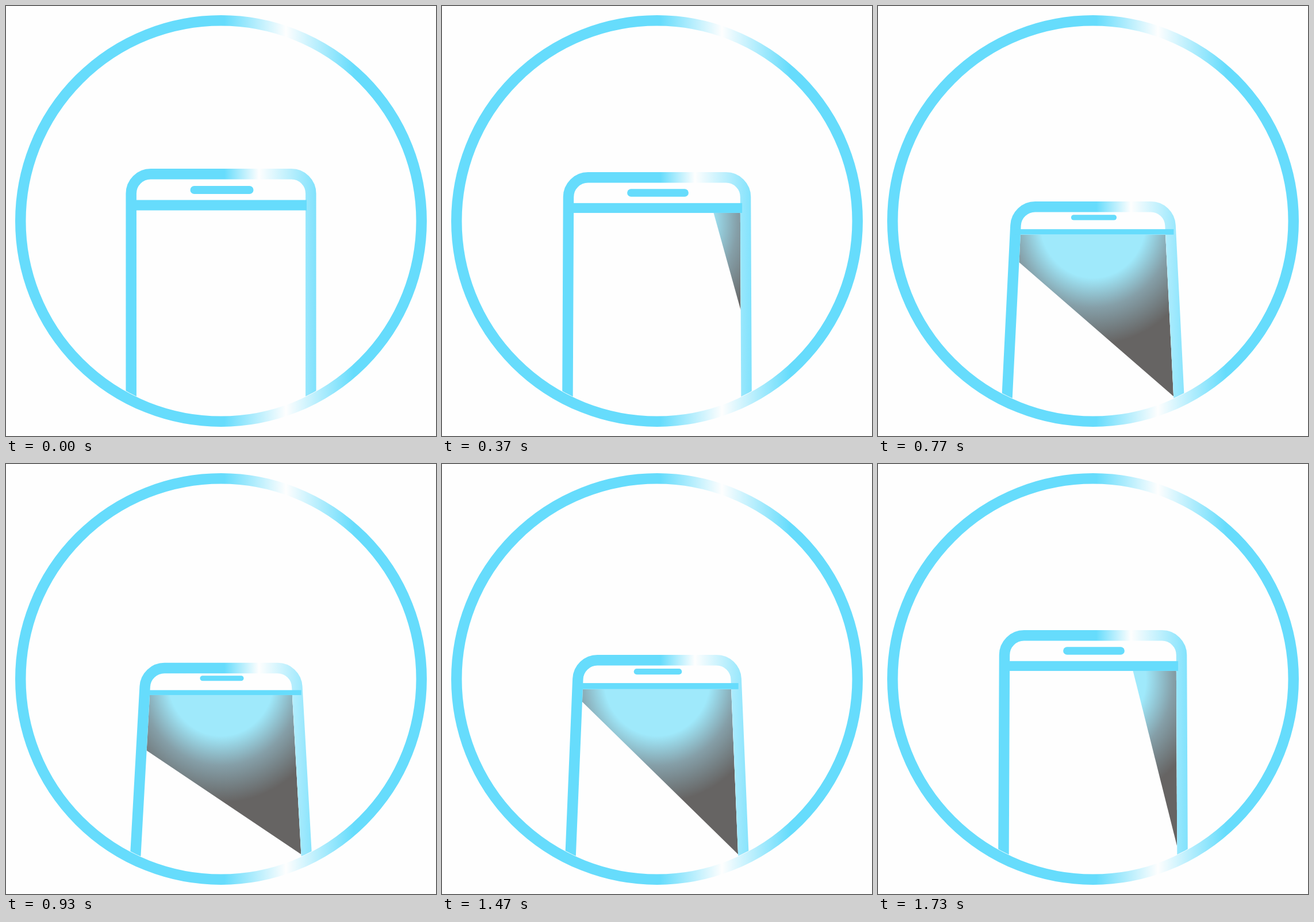
These frames come from a looping animation (748 by 748 pixels, 1770 ms). An HTML page with a canvas:

```html
<!DOCTYPE html>
<html>
<head>
<meta charset="utf-8">
<style>
html, body { margin: 0; width: 100%; height: 100%; overflow: hidden; background: #fefefe; }
canvas { display: block; }
</style>
</head>
<body>
<canvas id="stage" width="748" height="748"></canvas>
<script>
const ctx = document.getElementById('stage').getContext('2d');
const SIZE = 748, MID = SIZE / 2, LOOP = 1770, STROKE = 18.5;
const BLUE = '#66dcfc', WHITE = '#fefefe';

// step, tilt in px, glare reach along the top, glare reach down the right side
const KEYS = [
  [0, 0, 0, 0],
  [8, 1.3, 0, 0.25],
  [11, 6, 0.16, 0.53],
  [18, 35, 0.78, 0.87],
  [23, 57, 1.23, 1],
  [29, 63, 1.62, 1],
  [35, 60, 1.58, 1],
  [44, 49, 1.09, 1],
  [52, 6, 0.26, 0.956],
  [53, 2, 0.15, 0.94]
];

const fade = (...stops) => {
  const g = ctx.createLinearGradient(0, 0, SIZE, 0);
  for (const [x, color] of stops) g.addColorStop(x / SIZE, color);
  return g;
};
const ringPaint = fade([380, BLUE], [487, WHITE], [605, BLUE]);
const bodyPaint = fade([380, BLUE], [440, WHITE], [560, BLUE]);

const glarePaint = ctx.createRadialGradient(0, 0, 0, 0, 0, 215);
glarePaint.addColorStop(0.46, '#9fe9fb');
glarePaint.addColorStop(0.7, '#859fa8');
glarePaint.addColorStop(1, '#666463');

const secant = (i, c) =>
  KEYS[i + 1] ? (KEYS[i + 1][c] - KEYS[i][c]) / (KEYS[i + 1][0] - KEYS[i][0]) : 0;

// harmonic mean keeps the curve between its keys
function tangent(i, c) {
  if (i === 0) return 0;
  if (i === KEYS.length - 1) return secant(i - 1, c);
  const a = secant(i - 1, c), b = secant(i, c);
  return a * b > 0 ? 2 * a * b / (a + b) : 0;
}

function valueAt(step, c) {
  let i = 0;
  while (KEYS[i + 1][0] <= step) i++;
  const [p, q] = [KEYS[i], KEYS[i + 1]], w = q[0] - p[0], s = (step - p[0]) / w;
  return p[c] + (q[c] - p[c]) * s * s * (3 - 2 * s)
    + w * s * (1 - s) * (tangent(i, c) * (1 - s) - tangent(i + 1, c) * s);
}

function polygon(points) {
  ctx.beginPath();
  for (const [x, y] of points) ctx.lineTo(x, y);
  ctx.closePath();
}

function drawGlare(top, innerX, across, down) {
  const left = innerX(top), right = SIZE - left, end = top + down * (679 - top);
  ctx.save();
  polygon([[left, top], [right, top], [SIZE - innerX(720), 720], [innerX(720), 720]]);
  ctx.clip();
  polygon([[right, top], [right - across * (right - left), top], [SIZE - innerX(end), end]]);
  ctx.translate(MID, MID);
  ctx.scale(0.93, 1);
  ctx.fillStyle = glarePaint;
  ctx.fill();
  ctx.restore();
}

function drawPhone(step) {
  const tilt = valueAt(step, 1), across = valueAt(step, 2), down = valueAt(step, 3);
  const legX = y => 217.7 + tilt * (0.125 + 0.255 * (675 - y) / (349 - tilt));
  const innerX = y => legX(y) + STROKE / 2;
  const top = 292.3 + tilt, barTop = 337.5 + 0.89 * tilt, barHeight = 18 - 0.15 * tilt;

  if (across > 0) drawGlare(barTop + barHeight, innerX, across, down);

  ctx.strokeStyle = bodyPaint;
  ctx.beginPath();
  ctx.moveTo(legX(720), 720);
  ctx.arcTo(legX(top), top, MID, top, 34);
  ctx.arcTo(SIZE - legX(top), top, SIZE - legX(720), 720, 34);
  ctx.lineTo(SIZE - legX(720), 720);
  ctx.stroke();

  ctx.fillStyle = BLUE;
  const barLeft = legX(barTop);
  ctx.fillRect(barLeft, barTop, 523 - 0.15 * tilt - barLeft, barHeight);

  const half = 55 - 0.27 * tilt, h = 14 - 0.08 * tilt;
  ctx.beginPath();
  ctx.roundRect(375.5 - half, 320 + 0.84 * tilt - h / 2, half * 2, h, h / 2);
  ctx.fill();
}

function circle(r) {
  ctx.beginPath();
  ctx.arc(MID, MID, r, 0, Math.PI * 2);
}

function draw(now) {
  const t = Math.floor(now % LOOP / 10) * 10;
  const step = Math.floor((t + 5) * 0.03); // 30 steps a second

  ctx.fillStyle = WHITE;
  ctx.fillRect(0, 0, SIZE, SIZE);
  ctx.lineWidth = STROKE;

  ctx.save();
  circle(338.7);
  ctx.clip();
  drawPhone(step);
  ctx.restore();

  ctx.strokeStyle = ringPaint;
  circle(348.75);
  ctx.stroke();
}

function loop(now) {
  draw(now);
  requestAnimationFrame(loop);
}
draw(0);
requestAnimationFrame(loop);
</script>
</body>
</html>
```
